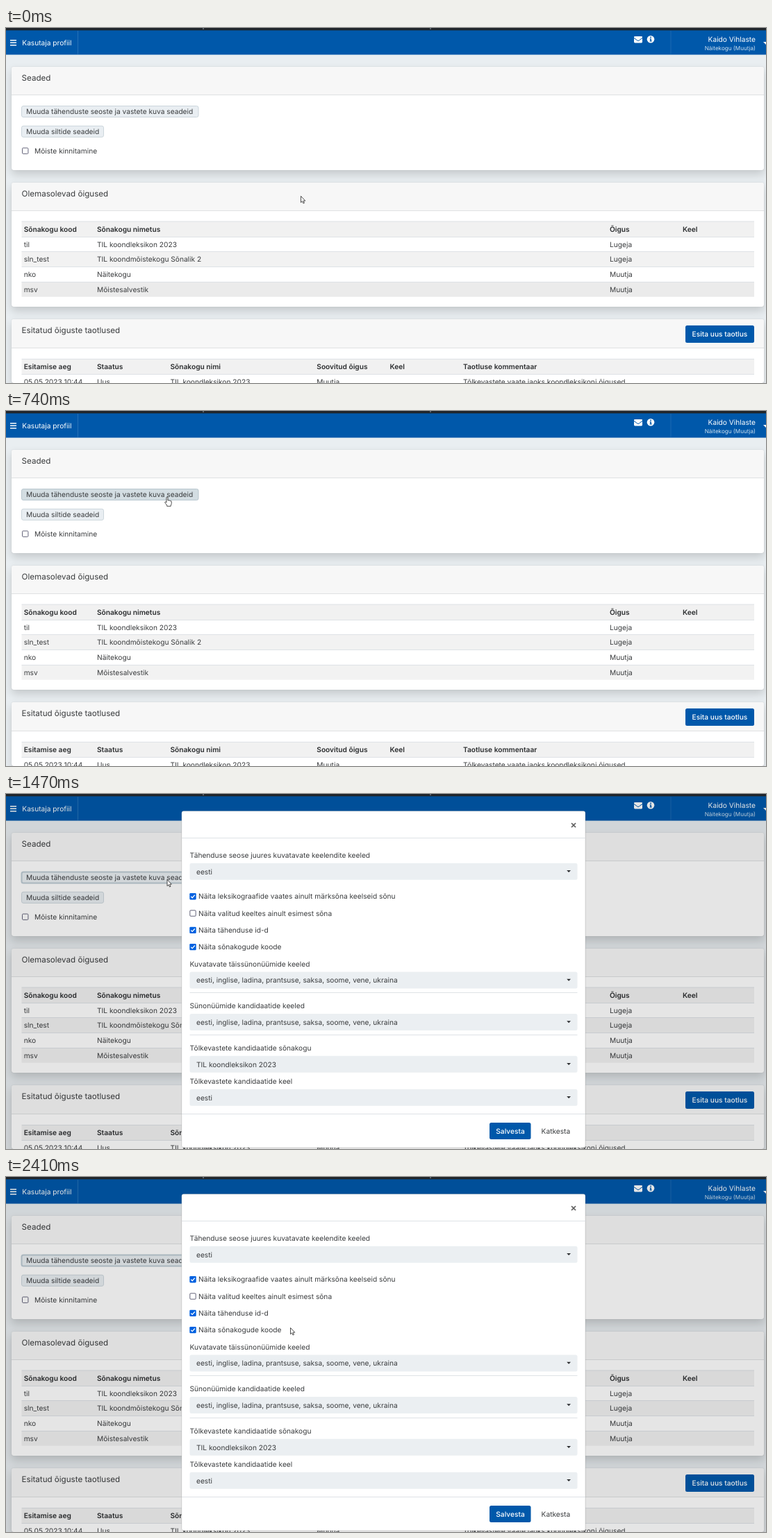
These frames come from a looping animation (1094 by 512 pixels, 2940 ms). An HTML page:

```html
<!DOCTYPE html>
<html lang="et">
<head>
<meta charset="utf-8">
<title>Kasutaja profiil</title>
<style>
html, body { margin: 0; width: 100%; height: 100%; overflow: hidden; background: #e9eef1; }
#stage { position: relative; width: 100%; height: 100%; overflow: hidden; contain: strict; }
.card { position: absolute; left: 8px; width: 1083px; background: #fff; border-radius: 3px;
  box-shadow: 0 6px 13px rgba(0,0,0,.16), 0 0 1px rgba(0,0,0,.25); }
.card::before { content: ""; display: block; height: var(--head); background: #f7f7f7;
  border-bottom: 1px solid #dfe1e2; border-radius: 3px 3px 0 0; }
svg { position: absolute; left: 0; top: 0; display: block; overflow: hidden; }
text { font: 10.18px Inter, sans-serif; fill: #3a3c3e; text-rendering: geometricPrecision; white-space: pre; }
.title { font-size: 11.6px; }
.bold { font-weight: 600; fill: #2b2d2f; }
.white { fill: #fff; }
.medium { fill: #fff; font-weight: 500; }
.small { font-size: 8.15px; fill: #cfe0f0; }
.end { text-anchor: end; }
</style>
</head>
<body>
<div id="stage">
<div class="card" style="top:56px;height:149px;--head:40px"></div>
<div class="card" style="top:223px;height:179px;--head:40px"></div>
<div class="card" style="top:420px;height:92px;--head:41px"></div>
<svg width="1094" height="512" viewBox="0 0 1094 512">
  <g id="page"></g>
  <g id="modal"></g>
  <path id="arrow" d="M.5 .5V9.7L2.6 7.8 4 11 5.5 10.3 4.1 7.2H6.8Z" fill="#fff" stroke="#222" stroke-width=".8"/>
  <path id="hand" d="M-1 1.2Q-1-.1 0-.1T1 1.2V5Q2 4.2 2.8 5.2 3.8 4.6 4.5 5.7 6.2 5.2 6.2 7V9.5Q6 11 5.2 12V13.3H-.3V12L-3 8.4Q-3.6 7.3-2.7 6.9-1.9 6.7-1 8Z" fill="#fff" stroke="#222" stroke-width=".8"/>
</svg>
</div>
<script>
const LOOP = 2940, BLUE = '#0058aa';
const $ = id => document.getElementById(id);

const rect = (x, y, w, h, fill, extra = '') =>
  `<rect x="${x}" y="${y}" width="${w}" height="${h}" fill="${fill}" ${extra}/>`;
// y is the middle of the capitals
const text = (x, y, label, cls = '') =>
  `<text x="${x}" y="${y + (cls === 'title' ? 4.1 : 3.7)}" class="${cls}">${label}</text>`;
const path = (d, fill, extra = '') => `<path d="${d}" fill="${fill}" ${extra}/>`;
const line = (x, y, w, color = '#dee2e6') => rect(x, y, w, 1, color);
const row = (y, columns, cells, cls) =>
  cells.map((cell, i) => text(columns[i], y, cell, cls)).join('');
const softButton = (id, y, w, label) =>
  rect(22.5, y, w, 16, '#e9eef2', `id="${id}" rx="2.5" stroke="#ccd6dc"`) + text(29, y + 8, label);
const checkbox = (x, y, checked, id = '') => checked
  ? rect(x, y - 4.5, 9.4, 9.4, '#0061e0', `id="${id}" rx="1.3"`) +
    path(`M${x + 2} ${y + .3}l1.9 1.9 3.6-4.1`, 'none', 'stroke="#fff" stroke-width="1.3"')
  : rect(x + .5, y - 4, 8.4, 8.4, '#fff', `id="${id}" rx="1.2" stroke="#64647a"`);

function header() {
  return rect(0, 0, 1094, 4, '#20252a') + rect(283, 0, 2, 2, '#59616a') + rect(610, 0, 2, 2, '#59616a') +
    rect(0, 3.4, 1094, 35.1, BLUE) +
    rect(103, 4, 1, 34, '#2871b7') + rect(956.5, 4, 1, 34, '#1d68b2') +
    [17, 20.5, 24].map(y => rect(6, y, 9, 1.5, '#fff')).join('') +
    text(23.3, 21.3, 'Kasutaja profiil', 'white') +
    rect(904, 12, 12, 9.4, '#fff', 'rx="1.3"') +
    path('M904 14.4l4.8 3.6q1.2.9 2.4 0l4.8-3.6', 'none', `stroke="${BLUE}"`) +
    '<circle cx="928" cy="16.3" r="5.3" fill="#fff"/>' +
    path('M927.2 12.6h1.7v1.6h-1.7zM926.6 15.2h2.3v3.1h.7v1.1h-3v-1.1h.7v-2h-.7z', BLUE) +
    text(1079, 16, 'Kaido Vihlaste', 'white end') +
    text(1079, 28.6, 'Näitekogu (Muutja)', 'small end') +
    path('M1090 20h8l-4 4z', '#fff');
}

function settings() {
  return text(22.6, 72.2, 'Seaded', 'title') +
    softButton('opener', 112.5, 254.5, 'Muuda tähenduste seoste ja vastete kuva seadeid') +
    softButton('labels', 141.3, 118, 'Muuda siltide seadeid') +
    checkbox(23, 177, false) + text(41, 177.2, 'Mõiste kinnitamine');
}

function permissions() {
  const columns = [25.7, 131, 869, 974], pitch = 21.8;
  const rows = [
    ['til', 'TIL koondleksikon 2023', 'Lugeja'],
    ['sln_test', 'TIL koondmõistekogu Sõnalik 2', 'Lugeja'],
    ['nko', 'Näitekogu', 'Muutja'],
    ['msv', 'Mõistesalvestik', 'Muutja']
  ];
  return text(22.6, 239.2, 'Olemasolevad õigused', 'title') +
    rect(22.5, 279, 1054.5, 22, '#f1f1f1') + line(22.5, 278.5, 1054.5) +
    row(290.2, columns, ['Sõnakogu kood', 'Sõnakogu nimetus', 'Õigus', 'Keel'], 'bold') +
    rows.map((cells, i) => {
      const y = 300.5 + i * pitch;
      return (i % 2 ? rect(22.5, y, 1054.5, pitch, '#f2f2f2', i === 3 ? 'id="lastRow"' : '') : '') +
        line(22.5, Math.round(y), 1054.5) + row(y + 11.3, columns, cells);
    }).join('');
}

function requests() {
  const columns = [25.7, 131, 236.5, 447.3, 552.5, 658];
  return text(22.6, 436.3, 'Esitatud õiguste taotlused', 'title') +
    rect(978, 429, 99, 25, BLUE, 'rx="2.5"') + text(987.6, 441.5, 'Esita uus taotlus', 'medium') +
    rect(22.5, 478, 1054.5, 22, '#f1f1f1') + line(22.5, 477, 1054.5) + line(22.5, 499, 1054.5) +
    row(488.7, columns, ['Esitamise aeg', 'Staatus', 'Sõnakogu nimi', 'Soovitud õigus', 'Keel', 'Taotluse kommentaar'], 'bold') +
    row(510.3, columns, ['05.05.2023 10:44', 'Uus', 'TIL koondleksikon 2023', 'Muutja', '',
      'Tõlkevastete vaate jaoks koondleksikoni õigused']);
}

const options = [
  { y: 147.5, end: 561, checked: true, label: 'Näita leksikograafide vaates ainult märksõna keelseid sõnu' },
  { y: 171.8, end: 470, checked: false, label: 'Näita valitud keeltes ainult esimest sõna' },
  { y: 196.2, end: 379, checked: true, label: 'Näita tähenduse id-d' },
  { y: 220.4, end: 397, checked: true, label: 'Näita sõnakogude koode' }
];

function dialog() {
  const languages = 'eesti, inglise, ladina, prantsuse, saksa, soome, vene, ukraina';
  const field = (labelY, label, y, value) => text(264.5, labelY, label) +
    rect(264.5, y - 12, 558, 24, '#ebeff2', 'rx="2.5"') + text(274, y + .2, value) +
    path(`M807.2 ${y - 1.8}h5.8l-2.9 3z`, '#2b2d2f');
  return rect(0, 4, 1094, 508, '#000', 'opacity=".1"') +
    rect(252.8, 24.6, 581.2, 485.4, '#fff', 'rx="3" stroke="#000" stroke-opacity=".14"') +
    path('M814 42l6 6m0-6l-6 6', 'none', 'stroke="#5c5c5c" stroke-width="1.7"') +
    line(253, 63, 581) + line(253, 461, 581) +
    field(88, 'Tähenduse seose juures kuvatavate keelendite keeled', 111.7, 'eesti') +
    options.map((o, i) => checkbox(264.3, o.y, o.checked, 'option' + i) + text(277, o.y, o.label)).join('') +
    field(244.8, 'Kuvatavate täissünonüümide keeled', 268.5, languages) + line(264.5, 286, 558) +
    field(305.4, 'Sünonüümide kandidaatide keeled', 329, languages) + line(264.5, 347, 558) +
    field(365.8, 'Tõlkevastete kandidaatide sõnakogu', 389.7, 'TIL koondleksikon 2023') +
    field(414, 'Tõlkevastete kandidaatide keel', 437.8, 'eesti') +
    rect(696, 474, 59.5, 24, BLUE, 'rx="2.5"') + text(705.3, 486.2, 'Salvesta', 'medium') +
    text(770.6, 486.2, 'Katkesta');
}

$('page').innerHTML = header() + settings() + permissions() + requests();
$('modal').innerHTML = dialog();

// Pointer samples: time, x, y; each holds until the next
const pointer = [
  [0, 424, 242], [70, 323, 192], [320, 264.5, 160], [390, 249, 145], [460, 241, 135],
  [530, 236, 128], [600, 233, 125], [670, 232, 124], [740, 232, 124],
  [1470, 231.5, 123], [1740, 233, 126], [1810, 238, 131], [1880, 247, 139], [1950, 259, 149],
  [2020, 276, 160], [2090, 301, 172], [2160, 329, 183], [2210, 354, 197],
  [2280, 380, 208], [2350, 399, 214], [2410, 409, 217]
];

function draw(t) {
  const [, x, y] = pointer.findLast(sample => sample[0] <= t);
  const open = t >= 1470, focused = t >= 1340;
  const hovering = !open && y < 129;

  $('modal').style.display = open ? '' : 'none';
  $('arrow').style.display = hovering ? 'none' : '';
  $('hand').style.display = hovering ? '' : 'none';
  for (const id of ['arrow', 'hand']) $(id).setAttribute('transform', `translate(${x} ${y})`);

  const opener = $('opener');
  const hoverFill = t >= 1270 ? '#cbd7dd' : t >= 600 ? '#d3dde2' : '#dde5ea';
  opener.setAttribute('fill', hovering ? hoverFill : '#e9eef2');
  opener.setAttribute('stroke', focused ? '#bccbd3' : hovering ? '#b9c7cf' : '#ccd6dc');
  opener.setAttribute('stroke-width', focused ? 2 : 1);
  $('lastRow').setAttribute('fill', t < 70 ? '#ebebeb' : '#f2f2f2');

  options.forEach((o, i) => {
    const hover = open && x >= 264 && x < o.end && Math.abs(y - o.y) < 12;
    $('option' + i).setAttribute(o.checked ? 'fill' : 'stroke',
      o.checked ? (hover ? '#0250bb' : '#0061e0') : (hover ? '#3f3f50' : '#64647a'));
  });
}

function tick() {
  draw(performance.now() % LOOP);
  requestAnimationFrame(tick);
}
tick();
</script>
</body>
</html>
```
